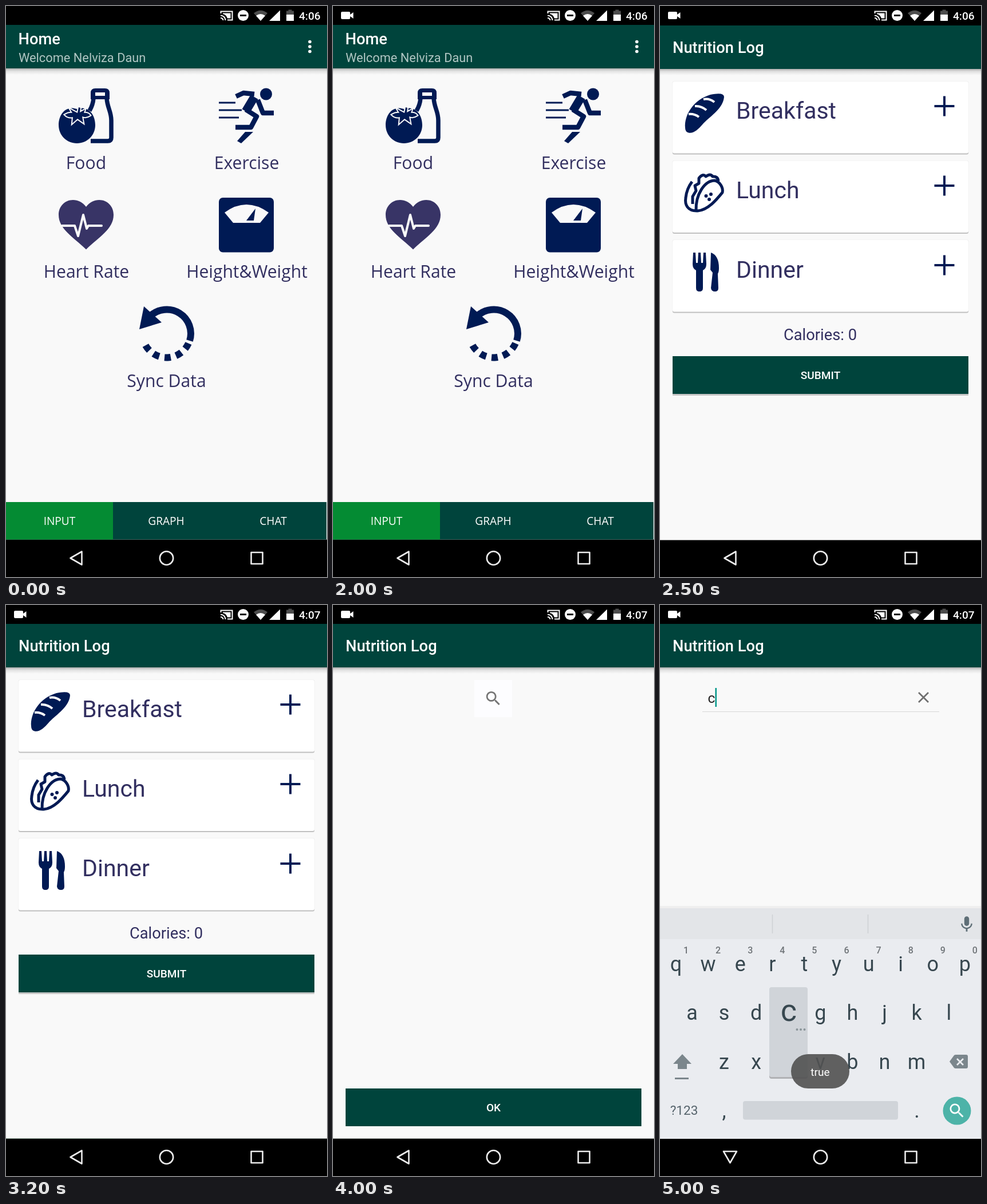
Write an HTML page that moves like this. It is 561x998 px and loops after 5.1 s.

```html
<!DOCTYPE html>
<html lang="en">
<head>
<meta charset="utf-8">
<style>
  html, body { margin: 0; width: 100%; height: 100%; overflow: hidden; background: #000; }
  svg { display: block; width: 561px; height: 998px; }
  text { font-family: Roboto, sans-serif; white-space: pre; }
  .mid { text-anchor: middle; }
  .title { font-size: 27.3px; font-weight: 500; fill: #fff; }
  .label { font: 30.1px "Open Sans", sans-serif; fill: #322f60; text-anchor: middle; }
  .tab { font: 19.1px "Open Sans", sans-serif; fill: #fff; text-anchor: middle; }
  .button { font-size: 19.1px; font-weight: 500; fill: #fff; text-anchor: middle; }
  .key { font-size: 36px; fill: #37474f; text-anchor: middle; }
  .digit { font-size: 16px; font-weight: 500; fill: #6f7478; text-anchor: middle; }
  .line { fill: none; }
</style>
</head>
<body>
<svg viewBox="0 0 561 998">
  <defs>
    <linearGradient id="fade" x2="0" y2="1">
      <stop offset="0" stop-opacity=".3"/>
      <stop offset=".4" stop-opacity=".1"/>
      <stop offset="1" stop-opacity="0"/>
    </linearGradient>
    <path id="lens" d="M15.5 14h-.79l-.28-.27C15.41 12.59 16 11.11 16 9.5 16 5.91 13.09 3 9.5 3S3 5.91 3 9.5 5.91 16 9.5 16c1.61 0 3.09-.59 4.23-1.57l.27.28v.79l5 4.99L20.49 19l-4.99-5zm-6 0C7.01 14 5 11.99 5 9.5S7.01 5 9.5 5 14 7.01 14 9.5 11.99 14 9.5 14z"/>
    <g id="window">
      <rect width="561" height="932.5"/>
      <rect y="33" width="561" height="899.5" fill="#f9f9f9"/>
      <rect y="109" width="561" height="11" fill="url(#fade)"/>
      <rect y="33" width="561" height="76" fill="#00443c"/>
    </g>
  </defs>
  <rect width="561" height="998"/>

  <g id="home">
    <use href="#window"/>
    <text class="title" x="21.5" y="67">Home</text>
    <text x="22" y="98" font-size="21.8" fill="#b0c6c3">Welcome Nelviza Daun</text>
    <g fill="#fff"><circle cx="531" cy="62.5" r="2.8"/><circle cx="531" cy="71" r="2.8"/><circle cx="531" cy="79.5" r="2.8"/></g>

    <g fill="#001a54">
      <!-- food -->
      <path d="M148 163V152Q148 144 156 144H173Q181 144 181 152V163ZM156 151V157H173V151Z" fill-rule="evenodd"/>
      <path class="line" d="M153 161Q152 173 146 183M176 161C177 178 184 184 184 200V230Q184 236 178 236H148" stroke="#001a54" stroke-width="7.5"/>
      <ellipse cx="124" cy="209" rx="34" ry="33" fill="#f9f9f9"/>
      <path d="M124 180C144 173 156 190 156 208C156 226 142 240 124 240S92 226 92 208C92 190 104 173 124 180Z"/>
      <path d="M125 187L127 177L130 178L129 186L138 181L136 187Q143 186 147 191Q140 196 133 193L135 204L125 197L116 205L117 194Q109 196 103 190Q110 186 116 187L112 180L121 185Z" stroke="#f9f9f9" stroke-width="4" paint-order="stroke"/>
      <!-- runner -->
      <circle cx="454.500" cy="154" r="10.5"/>
      <path d="M418 220H432L411 240L404 236Z"/>
      <g class="line" stroke="#001a54" fill="none" stroke-linejoin="round">
        <path d="M372 169H401M372 182H412M372 195H407" stroke-width="3"/>
        <path d="M402 158L415 152L434 154M440 164L449 187H468M419 181L438 193L428 212H401" stroke-width="8.5"/>
        <path d="M434 159L419 184" stroke-width="15"/>
      </g>
      <!-- scale -->
      <rect x="372" y="335" width="96" height="95.5" rx="7"/>
      <path d="M382 361Q420 333 459 361L444 379H397Z" fill="#f9f9f9"/>
      <path d="M420 375L436 354L433 375Z"/>
      <!-- sync -->
      <path d="M241 525L272 553L233 565Z"/>
      <g class="line" stroke="#001a54" stroke-width="12" fill="none">
        <path d="M252 542A42 42 0 0 1 321 585"/>
        <path d="M318.9 589.6A42 42 0 0 1 243.8 592.9" stroke-dasharray="11 9.4"/>
      </g>
    </g>
    <!-- heart -->
    <path d="M140 425.5C118 404 92 390 92 365C92 350 103 339 117 339C126 339 134 343 140 351C146 343 154 339 163 339C177 339 188 350 188 365C188 390 162 404 140 425.5Z" fill="#383466"/>
    <path class="line" d="M98 384H120L126 402L135 365L141 389L144 384H167" stroke="#f9f9f9" stroke-width="4" stroke-linejoin="round" stroke-linecap="round"/>

    <text class="label" x="140" y="285">Food</text>
    <text class="label" x="420.5" y="285">Exercise</text>
    <text class="label" x="140.5" y="475">Heart Rate</text>
    <text class="label" x="421" y="475">Height&amp;Weight</text>
    <text class="label" x="280.5" y="666">Sync Data</text>
    <rect y="867" width="560" height="65.5" fill="#00443c"/>
    <rect y="867" width="187" height="65.5" fill="#048b33"/>
    <text class="tab" x="93.5" y="907">INPUT</text>
    <text class="tab" x="280" y="907">GRAPH</text>
    <text class="tab" x="467" y="907">CHAT</text>
  </g>

  <g id="log">
    <use href="#window"/>
    <text class="title" x="22" y="81">Nutrition Log</text>
    <g id="cards"></g>
    <g fill="#001a54">
      <!-- bread -->
      <path d="M44 212C42 190 58 163 88 154Q112 149 112 158C110 178 90 190 76 204C66 216 58 222 50 220.5Q44 219 44 212Z"/>
      <path class="line" d="M50 188Q60 187 68 193M61 174Q72 173 81 181M76 162Q86 160 95 167" stroke="#fff" stroke-width="4"/>
      <!-- taco -->
      <g class="line" stroke="#001a54" stroke-width="5" fill="none" stroke-linejoin="round">
        <path d="M63 357C62 328 78 304 96 304C104 306 111 316 109 325C100 336 84 356 66 357C48 358 43 346 45 334C46 324 50 314 56 306"/>
        <path d="M57 345V332L63 322L61 313L68 309V300Q75 291 80 297Q88 291 92 297Q101 296 102 305"/>
      </g>
      <circle cx="80.5" cy="331" r="3"/><circle cx="89" cy="328" r="3"/><circle cx="86" cy="337" r="3"/>
      <!-- cutlery -->
      <path d="M58 430H62L63 448H66L67 430H71L72 448H75L76 430H80L81 450Q81 458 75 461V492Q75 498 69 498T63 492V461Q57 458 57 450Z"/>
      <path d="M89 430Q103 435 103 457Q103 464 101 467L102 492Q102 498 96 498T89 492L92 465L88 460Z"/>
    </g>
    <text class="mid" x="280" y="583" font-size="27.3" fill="#322f60">Calories: 0</text>
    <rect x="22" y="613" width="517" height="67" fill="#000" opacity=".2"/>
    <rect x="22" y="611" width="517" height="66" fill="#00443c"/>
    <text class="button" x="280.5" y="651">SUBMIT</text>
  </g>

  <g id="search">
    <use href="#window"/>
    <text class="title" x="22" y="81">Nutrition Log</text>
    <g id="closed">
      <rect x="247" y="131" width="66" height="65" fill="#fdfdff"/>
      <use href="#lens" transform="translate(263.7 147)scale(1.365)" fill="#757575"/>
    </g>
    <g id="open">
      <rect x="74" y="186" width="414" height="1" fill="#d8d8d8"/>
      <path class="line" id="clear" d="M452 153L469 170M469 153L452 170" stroke-width="2.8"/>
      <g id="hint">
        <use href="#lens" transform="translate(90.2 149.2)scale(1.26)" fill="#d0d0d0"/>
        <text x="126" y="173" font-size="24.6" fill="#757575">SearchView</text>
      </g>
      <text id="typed" x="83.5" y="171" font-size="24.6" fill="#212121">c</text>
      <rect id="caret" y="145" width="2.5" fill="#009688"/>
    </g>
    <rect x="22" y="845" width="517" height="66" fill="#00443c"/>
    <text class="button" x="280.5" y="885">OK</text>
  </g>

  <g id="keyboard">
    <rect y="526" width="561" height="4" fill="#000" opacity=".04"/>
    <rect y="530" width="561" height="403" fill="#eaecf0"/>
    <rect y="530" width="561" height="54" fill="#e3e5e8"/>
    <path d="M196.5 541V574M363.5 541V574" stroke="#cdd1d4" stroke-width="1.5"/>
    <path fill="#5f6f77" transform="translate(519.2 541.4)scale(1.4)" d="M12 14c1.66 0 2.99-1.34 2.99-3L15 5c0-1.66-1.34-3-3-3S9 3.34 9 5v6c0 1.66 1.34 3 3 3zm5.3-3c0 3-2.54 5.1-5.3 5.1S6.7 14 6.7 11H5c0 3.41 2.72 6.23 6 6.72V21h2v-3.28c3.28-.48 6-3.3 6-6.72h-1.7z"/>
    <g id="keys"></g>
    <g fill="#7b868c">
      <path d="M39 785L55 802H47V811H31V802H23Z"/>
      <rect x="26" y="826" width="24" height="3"/>
      <path d="M506 798L514 787Q515 786 517 786H535Q538 786 538 789V807Q538 810 535 810H517Q515 810 514 809Z"/>
    </g>
    <path d="M519 793L530 804M530 793L519 804" stroke="#eaecf0" stroke-width="2.8"/>
    <text class="mid" x="42" y="891" font-size="22.5" fill="#55636b">?123</text>
    <text class="key" x="112" y="896">,</text>
    <text class="key" x="449" y="896">.</text>
    <rect x="145" y="867" width="271" height="32.5" rx="4" fill="#d0d4d9"/>
    <circle cx="519" cy="884" r="24.5" fill="#4db3a8"/>
    <use href="#lens" transform="translate(502.4 867.5)scale(1.37)" fill="#fff"/>
    <g id="popup">
      <rect x="191" y="670" width="67" height="158" rx="4" fill="#000" opacity=".25"/>
      <rect x="191" y="668" width="67" height="157" rx="4" fill="#d0d4d9"/>
      <text class="mid" x="225" y="727" font-size="54" fill="#37474f">c</text>
      <g fill="#8a9499"><circle cx="239.5" cy="742" r="2"/><circle cx="246" cy="742" r="2"/><circle cx="252.5" cy="742" r="2"/></g>
    </g>
  </g>

  <g id="toast">
    <rect x="229" y="785" width="102" height="60" rx="30" fill="#515151" opacity=".9"/>
    <text class="mid" x="280" y="823" font-size="19.1" fill="#fff">true</text>
  </g>

  <!-- navigation bar -->
  <g class="line" stroke="#ebebeb" stroke-width="2.6" fill="none">
    <path id="back" d="M112.5 965L132.5 953.5V976.5Z" stroke-linejoin="round"/>
    <circle cx="280.5" cy="965" r="11.7"/>
    <rect x="428.5" y="955" width="20" height="20" stroke-linejoin="round"/>
  </g>

  <!-- status bar -->
  <g fill="#fff">
    <path id="camera" d="M16 10H28Q30 10 30 12V15L35.5 11V22L30 18V21Q30 23 28 23H16Q14 23 14 21V12Q14 10 16 10Z"/>
    <path class="line" d="M375.5 13V9.5H395.5V24.5H387M375 16.5A8.5 8.5 0 0 1 383.5 25M375 21A4.5 4.5 0 0 1 379.5 25" stroke="#fff" stroke-width="2"/>
    <path d="M379 12.5H392.5V21.5H387Q384.5 14.5 379 14Z"/>
    <circle cx="414.5" cy="16.5" r="9.5"/>
    <rect x="409" y="15" width="11" height="3" fill="#000"/>
    <path d="M433 12.5Q445 3 457 12.5L445 26Z" fill="#4d4d4d"/>
    <path d="M437 17Q445 11 453 17L445 26Z"/>
    <path d="M460 26L479 7.5V26Z"/>
    <path d="M490 8.5H493.5V6.5H499.5V8.5H503V16H490Z" fill="#4d4d4d"/>
    <rect x="490" y="15" width="13" height="11"/>
    <text id="clock" x="512" y="24" font-size="19.1" font-weight="500"></text>
  </g>
</svg>
<script>
const LOOP = 5100, STEP = 100;
const $ = id => document.getElementById(id);
const show = (id, on) => $(id).style.display = on ? '' : 'none';
const clamp = v => Math.min(1, Math.max(0, v));
const left = (t, start, span) => (1 - clamp((t - start) / span)) ** 5;

$('cards').innerHTML = ['Breakfast', 'Lunch', 'Dinner'].map((name, i) => {
  const y = i * 139;
  return `<g transform="translate(0 ${y - i * .5})">
    <rect x="21.5" y="130.5" width="518" height="128" rx="3" opacity=".06"/>
    <rect x="22" y="132" width="517" height="126.5" rx="3" opacity=".18"/>
    <rect x="22" y="131" width="517" height="125.5" rx="3" fill="#fff"/></g>
    <text x="133" y="${196 + y}" font-size="41" fill="#322f60">${name}</text>
    <path d="M479.5 ${174 + y}H514.5M497 ${156.5 + y}V${191.5 + y}" stroke="#001a54" stroke-width="4"/>`;
}).join('');

const rows = [['qwertyuiop', 28, 639.5], ['asdfghjkl', 56, 725], ['zxcvbnm', 112, 810.5]];
$('keys').innerHTML = rows.map(([letters, x, y], row) => [...letters].map((c, i) =>
  `<text class="key" x="${x + i * 56.1}" y="${y}">${c}</text>` +
  (row ? '' : `<text class="digit" x="${45.5 + i * 56.1}" y="609">${(i + 1) % 10}</text>`)
).join('')).join('');

// A new window fades in while rising to its place.
function enter(id, t, start) {
  show(id, t > start);
  $(id).setAttribute('opacity', 1 - left(t, start, 225));
  $(id).setAttribute('transform', `translate(0 ${Math.round(80 * left(t, start, 300))})`);
}

function draw(t) {
  const searching = t >= 4300, typed = t >= 5000;
  show('camera', t >= 100);
  $('clock').textContent = t < 2900 ? '4:06' : '4:07';
  enter('log', t, 2325);
  enter('search', t, 3325);

  show('closed', !searching);
  show('open', searching);
  show('hint', !typed);
  show('typed', typed);
  $('clear').setAttribute('stroke', typed ? '#6f6f6f' : '#d0d0d0');
  $('caret').setAttribute('x', typed ? 96.5 : 84);
  $('caret').setAttribute('height', typed ? 33 : 37);

  const rest = left(t, 4315, 200);
  show('keyboard', t > 4315);
  $('keyboard').setAttribute('opacity', 1 - rest);
  $('keyboard').setAttribute('transform', `translate(0 ${20 * rest})`);
  $('back').setAttribute('transform', `rotate(${t > 4315 ? -90 : 0} 122.5 965)`);
  show('popup', t >= 4900);
  $('toast').setAttribute('opacity', clamp((t - 4255) / 200));
}

const begin = performance.now();
function tick() {
  const t = (performance.now() - begin) % LOOP;
  draw(Math.floor(t / STEP) * STEP);
  requestAnimationFrame(tick);
}
tick();
</script>
</body>
</html>
```
